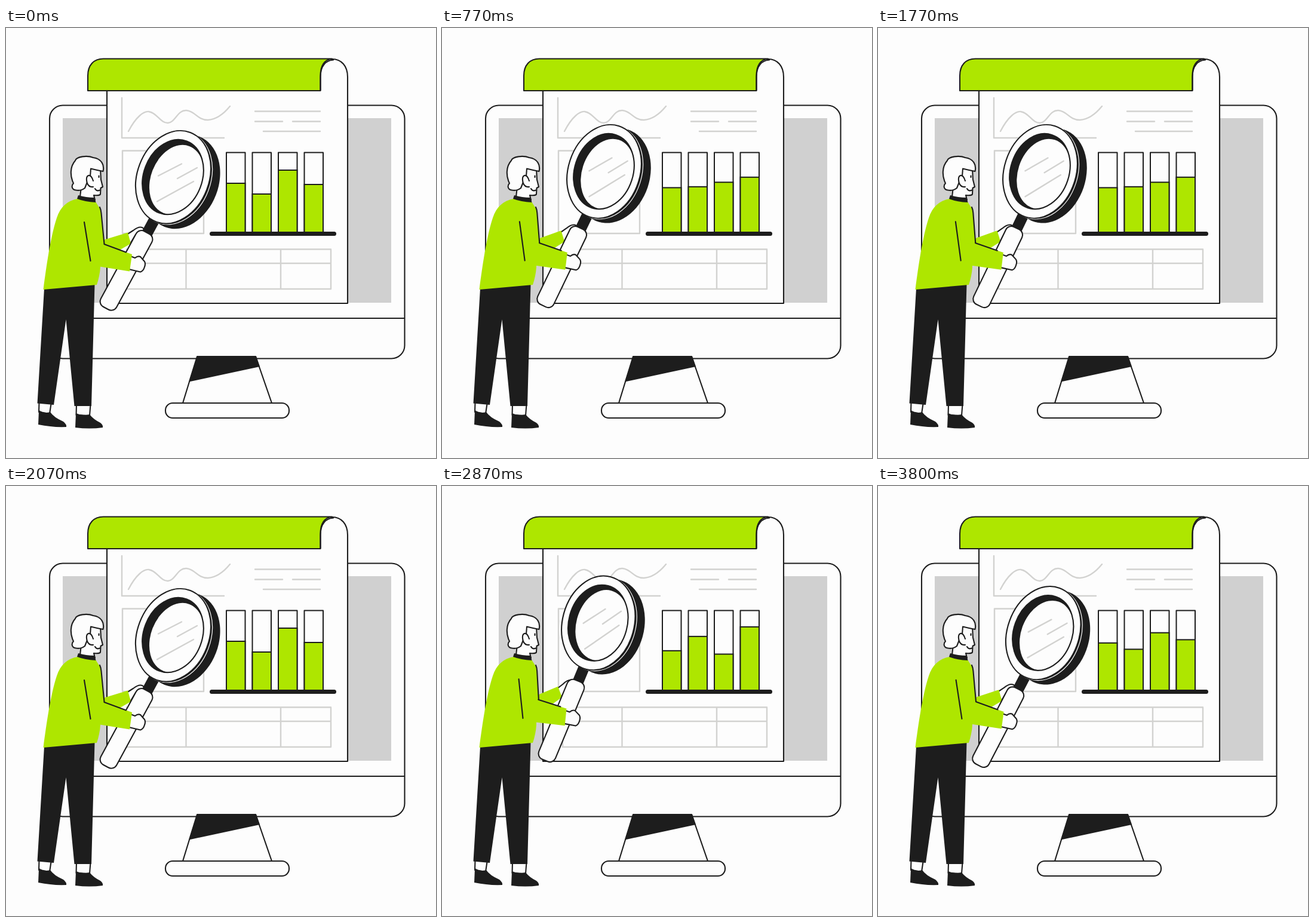
Animation of 720x720 px, one loop 3.83 s. Source, as an HTML page:

```html
<!DOCTYPE html>
<html lang="en">
<head>
<meta charset="utf-8">
<title>Report under the magnifier</title>
<style>
  @property --t { syntax: '<number>'; inherits: true; initial-value: 0; }
  @property --x { syntax: '<number>'; inherits: true; initial-value: 0; }
  @property --p { syntax: '<number>'; inherits: true; initial-value: 0; }

  html, body { margin: 0; width: 100%; height: 100%; overflow: hidden; background: #fdfdfd; }

  svg {
    --ink: #1d1d1d;
    --lime: #aee600;
    --paper: #fdfdfd;
    --pale: #d2d2d0;
    display: block; width: 100%; height: 100%;
    animation: tick 3830ms steps(115) -4ms infinite;
    /* two swings there and back; the loop cuts the last return short */
    --x: calc(clamp(0, (var(--t) - 16) / 17, 1) - clamp(0, (var(--t) - 43) / 17, 1)
            + clamp(0, (var(--t) - 74) / 17, 1) - clamp(0, (var(--t) - 101) / 17, 1));
    --p: calc(var(--x) * var(--x) * (3 - 2 * var(--x)));
  }
  @keyframes tick { from { --t: 0; } to { --t: 115; } }

  .out, .line { stroke: var(--ink); stroke-width: 2.1; stroke-linejoin: round; stroke-linecap: round; }
  .out { fill: var(--paper); }
  .line { fill: none; }
  .pale { fill: none; stroke: var(--pale); stroke-width: 2.4; stroke-linecap: round; stroke-linejoin: round; }
  .ink { fill: var(--ink); }
  .lime { fill: var(--lime); }
  .white { fill: var(--paper); }
  .level { fill: var(--lime); stroke: var(--ink); stroke-width: 2; transform: translateY(calc(var(--p) * var(--d))); }

  .lens {
    transform-origin: 279.5px 249.5px;
    transform: translate(calc(var(--p) * -23px), calc(var(--p) * -25.5px)) rotate(calc(var(--p) * -7.5deg));
  }
  .far-arm {
    transform-origin: 204px 350px;
    transform: translate(calc(var(--p) * -11.5px), calc(var(--p) * -8.5px)) rotate(calc(var(--p) * -7deg));
  }
  .upper-arm {
    transform-origin: 158px 302px;
    transform: rotate(calc(var(--p) * 3.4deg)) scaleY(calc(1 - var(--p) * .085));
  }
  .forearm {
    transform-origin: 164px 362px;
    transform: translate(calc(var(--p) * -4px), calc(var(--p) * -5.5px)) rotate(calc(var(--p) * -3deg));
  }
  .fold {
    transform-origin: 131px 324px;
    transform: translate(calc(var(--p) * -3px), calc(var(--p) * -2px)) rotate(calc(var(--p) * 4deg));
  }
</style>
</head>
<body>
<svg viewBox="0 0 720 720">
  <defs>
    <clipPath id="tubes"><rect x="360" y="200" width="180" height="142"/></clipPath>
    <clipPath id="hole"><ellipse rx="49" ry="64.400"/></clipPath>
  </defs>

  <!-- monitor -->
  <rect class="out" x="73" y="129.500" width="594.500" height="424" rx="22"/>
  <path class="line" d="M73 486H667"/>
  <rect x="95" y="151" width="550" height="309" fill="#d0d0d0"/>
  <path class="out" d="M320 550H418L445 628H296Z"/>
  <path class="ink" d="M320 549.500H419L425 567L306 592.500Z"/>
  <rect class="out" x="267" y="628" width="207" height="25" rx="12"/>

  <!-- rolled report -->
  <path class="out" d="M169 100V461H572V82C572 64 562 52 546 52H300V100Z"/>
  <path class="out" style="fill:var(--lime)" d="M137 105V80C137 62 147 51.500 163 51.500H546C534 53 526.500 62 526.500 80V105Z"/>
  <path class="line" d="M526.500 104V82C526.500 63 536 54 548 53.500"/>

  <g class="pale">
    <path d="M194 117V184H365"/>
    <path d="M205 173C218 148 231 139 239 140C253 142 258 159 271 159C284 158 287 137 302 138C317 139 320 154 338 154C354 153 366 142 375 131"/>
    <path d="M417 139.500H526M417 156.500H463M480 156.500H526M431 173H526"/>
    <path d="M195 205.500H331V344H195Z"/>
    <path d="M202 370.500H544V437H202ZM202 394H544M301.500 371V437M460 371V437"/>
  </g>

  <!-- bar chart -->
  <g class="out" style="stroke-width:2">
    <rect x="369" y="208.500" width="31.500" height="134"/>
    <rect x="412.500" y="208.500" width="31.500" height="134"/>
    <rect x="456" y="208.500" width="31.500" height="134"/>
    <rect x="499.500" y="208.500" width="31.500" height="134"/>
  </g>
  <g clip-path="url(#tubes)">
    <rect class="level" style="--d:20px" x="369" y="260" width="31.500" height="160"/>
    <rect class="level" style="--d:-33px" x="412.500" y="278" width="31.500" height="160"/>
    <rect class="level" style="--d:55px" x="456" y="238" width="31.500" height="160"/>
    <rect class="level" style="--d:-33px" x="499.500" y="262" width="31.500" height="160"/>
  </g>
  <path class="line" style="stroke-width:7" d="M344.500 344.500H549.500"/>

  <!-- far arm -->
  <g class="far-arm">
    <path class="out" d="M202 346L213 339Q222 332 228 334L235 339L228 346L217 346L208 361Z"/>
    <path class="lime" d="M140 362L204 342.500L209 361L188 373L150 380Z"/>
  </g>

  <!-- magnifier -->
  <g class="lens">
    <g transform="translate(202 405) rotate(28.500)">
      <rect class="ink" x="-8.500" y="-106" width="18.500" height="40"/>
      <rect class="out" x="-15" y="-71" width="30" height="144" rx="10"/>
    </g>
    <g transform="translate(279.500 249.500) rotate(21)">
      <ellipse class="ink" cx="17" cy="2" rx="61" ry="81"/>
      <ellipse cx="3.500" cy=".5" rx="60" ry="80" fill="none" stroke="#fdfdfd" stroke-width="1.200"/>
      <ellipse class="out" cx=".5" rx="60" ry="80"/>
      <ellipse class="ink" rx="49" ry="64.400"/>
      <ellipse class="white" cx="7.200" cy="2" rx="43" ry="60" clip-path="url(#hole)"/>
      <ellipse class="line" rx="49" ry="64.400"/>
    </g>
    <path class="pale" d="M255 247.500L294 227.500M287 252L320 234M253 290.500L314 257"/>
  </g>

  <!-- legs and shoes -->
  <path class="out" d="M55.500 626L55 643L73 646L76 626ZM118 630L117.500 648L140 649L141.500 630Z"/>
  <path class="ink" d="M64 436L148.500 429L143 633H114.500L100.500 488L80 631L52.500 628.500Z"/>
  <path class="ink" d="M55 640Q65 646 74 643Q80 652 96 659Q102 664 101 668Q78 669 54 664Z"/>
  <path class="ink" d="M117 645Q128 650 140 647Q146 655 158 661Q163 665 162 669Q140 672 116 669Z"/>

  <!-- head -->
  <path class="out" d="M126 266L124 283L149 288L147 280Q156 281 158 278.500L158.500 268L162 266L159 254L158 236L140 230Z"/>
  <path class="out" d="M132 268Q126 273 117 271.500C110 271 109 264 113 260C107 248 107 232 116 222C118 215 136 213 146 217C160 219 165 229 162.500 240Q152 238 142 235.500L141 248Q134 246 136 258Z"/>
  <path class="out" d="M146 266Q139 267 136 260Q133 249 138 247Q143 246 146 256"/>
  <path class="line" d="M149 269Q152 274 157 271.500M155.500 247.500V250"/>

  <!-- jacket -->
  <path class="lime" d="M120 286C102 289 91 300 85 318C75 348 68 396 62.500 438L152 430Q157 415 158 400L157 330L157 302L150 291Z"/>
  <path class="ink" d="M121 280Q134 284 148 284L150.500 292Q132 291 119 286Z"/>

  <!-- near arm -->
  <g class="upper-arm">
    <path class="lime" d="M146 296L158 301L164.500 362L145 385Z"/>
    <path class="line" d="M157 300Q159 304 159.500 310L164.500 361.500"/>
  </g>
  <g class="forearm">
    <path class="out" d="M207 381.500L216 385Q221 381 225 383L232 391Q234 395 232 400Q230 407 225 408.500L206 404Z"/>
    <path class="lime" d="M145 362H164L211 379L207 407.500L154 399L140 385Z"/>
    <path class="line" d="M164.500 362L201 375.500"/>
  </g>
  <path class="line fold" d="M131 325L141.500 390"/>
</svg>
</body>
</html>
```
